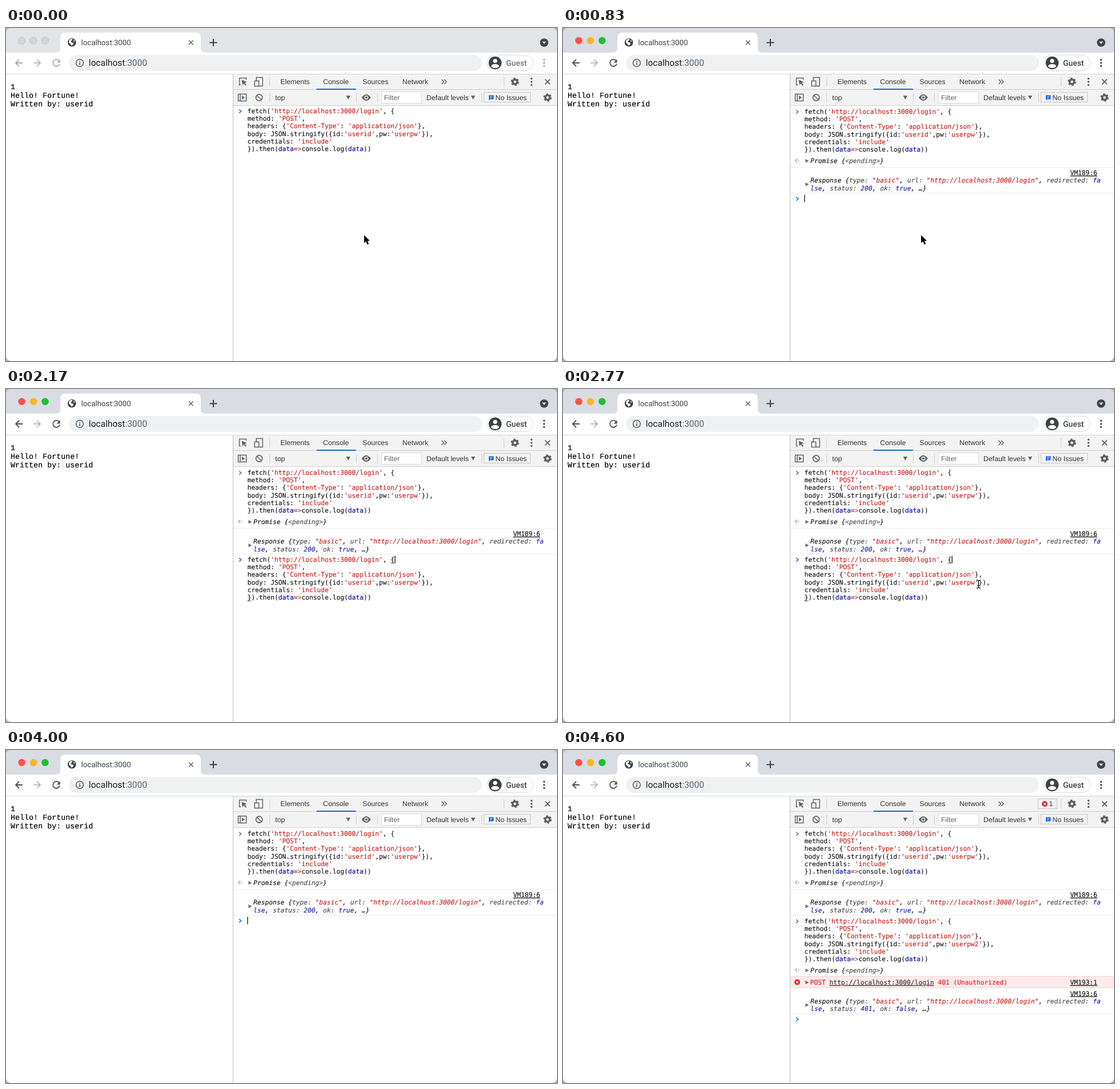
An HTML page that plays this animation: 962 px wide and 582 px high, repeating every 4860 ms.

```html
<!DOCTYPE html>
<html lang="en">
<head>
<meta charset="utf-8">
<title>Console login</title>
<style>
  html, body { margin: 0; width: 100%; height: 100%; overflow: hidden; background: #b4b5b7; }
  svg { display: block; width: 962px; height: 582px; --frame: #d9dce3; --ink: #494c50; --name: #3c4043; }
  svg.idle { --frame: #e3e4e8; --ink: #a9abae; --name: #717477; }
  text { white-space: pre; text-rendering: geometricPrecision; }
  .ui { font: 12.3px "Liberation Sans", Arial, sans-serif; fill: #333; }
  .bar { font-family: Roboto, sans-serif; fill: #3c4043; }
  .page { font: 13.33px "Liberation Mono", monospace; stroke: #000; stroke-width: .2; }
  .code { font: 11.22px "DejaVu Sans Mono", monospace; color: #111; }
  .code, .code tspan { fill: currentColor; stroke: currentColor; stroke-width: .12; }
  .it { font-style: italic; }
  .s { color: #c41a16; } .v { color: #00009f; } .o { color: #a52a2a; }
  .n { color: #1a1aa6; } .k { color: #484848; } .u { text-decoration: underline; }
  .err { color: #e0161e; } .err .u { color: #333; }
  .line { fill: none; stroke: #5f6368; stroke-width: 1.5; }
  .ink { fill: none; stroke: var(--ink); stroke-width: 1.8; }
  .light { fill: var(--c); }
  .idle .light { fill: #d3d4d8; stroke: #c2c3c7; }
</style>
</head>
<body>
<svg id="stage" viewBox="0 0 962 582"></svg>
<script>
const LOOP = 4860, LEFT = 421.5, CHAR = 6.755, ROW = 13.2;
const stage = document.getElementById('stage');

const text = (x, y, cls, s, more = '') => `<text x="${x}" y="${y}" class="${cls}" ${more}>${s}</text>`;
const rect = (x, y, w, h, fill, more = '') => `<rect x="${x}" y="${y}" width="${w}" height="${h}" fill="${fill}" ${more}/>`;
const circle = (x, y, r, fill, more = '') => `<circle cx="${x}" cy="${y}" r="${r}" fill="${fill}" ${more}/>`;
const path = (d, cls = 'line', more = '') => `<path d="${d}" class="${cls}" ${more}/>`;
const solid = (d, fill = '#5f6368') => `<path d="${d}" fill="${fill}"/>`;
const cross = (x, y, r, more) => path(`M${x - r} ${y - r}l${2 * r} ${2 * r}m0 ${-2 * r}l${-2 * r} ${2 * r}`, 'line', more);
const dots = (x, y, fill) => [-5.5, 0, 5.5].map(d => circle(x, y + d, 1.7, fill)).join('');
const gear = (x, y) =>
  circle(x, y, 4, 'none', 'stroke="#5a5d61" stroke-width="3.4"') +
  circle(x, y, 6.3, 'none', 'stroke="#5a5d61" stroke-width="1.9" stroke-dasharray="3.3 3.3"');
const down = (x, y, fill) => solid(`M${x - 3.7} ${y - 3}h7.4l-3.7 6.4z`, fill);
const rule = y => rect(397, y, 565, 1, '#ececec');
const divider = (x, y) => rect(x, y, 1, 16, '#ccc');
// Visible during [from, to) pairs given in ms.
const on = (times, html) => `<g data-on="${times}">${html}</g>`;

function browser() {
  const lights = ['#fe5148', '#fdb424', '#1fc032'].map((c, i) =>
    circle(27.5 + 20.4 * i, 22, 6.2, c, `class="light" style="--c:${c}"`)).join('');
  return rect(0, 0, 962, 582, '#fff') + rect(0, 0, 962, 43, 'var(--frame)') + lights +
    solid('M87 43q8 0 8-8V17q0-9 9-9H331q9 0 9 9V35q0 8 8 8z', '#fff') +
    circle(115, 25.3, 7.3, '#3e4145') +
    solid('M110 22q2-3.500 6-3l-1 3-2 1 1 2 4 1-1 3-3 2-1-3-3-2zM117.500 20l3 3-2 1z', '#fff') +
    text(131.3, 30, 'bar', 'localhost:3000', 'font-size="13.2"') +
    cross(323, 25.5, 3.8) + path('M362 19v13m-6.500-6.500h13', 'line', 'style="stroke:#3c4043;stroke-width:2"') +
    circle(939.5, 25.5, 7.3, '#3f4246') + solid('M936 23.800h7l-3.500 4.200z', '#fff') +
    path('M29 61H17m6-6l-6 6 6 6', 'ink') +
    path('M48 61H60m-6-6l6 6-6 6', 'line', 'style="stroke:#a9abae"') +
    path('M92.500 57A6 6 0 1 0 93.800 62.500', 'ink') + solid('M94.500 54.500v6h-6z', 'var(--ink)') +
    rect(110, 47, 721, 28, '#eff1f3', 'rx="14"') +
    circle(128.7, 61, 6.4, 'none', 'stroke="#55585c" stroke-width="1.500"') +
    rect(127.9, 60, 1.6, 4.8, '#55585c') + rect(127.9, 57, 1.6, 1.7, '#55585c') +
    text(144.5, 66.3, 'bar', '<tspan fill="#202124">localhost</tspan><tspan fill="#5f6368">:3000</tspan>', 'font-size="15.5"') +
    rect(839.5, 47.5, 81, 27, '#fff', 'rx="13.5" stroke="#dadce0"') +
    circle(854, 61, 11.3, '#3e4145') + circle(854, 57.5, 3.6, '#fff') +
    solid('M847 67.500q0-4.500 7-4.500t7 4.500q-3 2.500-7 2.500t-7-2.500z', '#fff') +
    text(873, 66.2, 'bar', 'Guest', 'font-size="13.9" font-weight="500" style="fill:var(--name)"') +
    dots(939.5, 61, 'var(--ink)') +
    rect(0, 80, 962, 1, '#d4d6d9') +
    ['1', 'Hello! Fortune!', 'Written by: userid'].map((s, i) => text(8, 106.6 + 15.2 * i, 'page', s)).join('');
}

function toolbar() {
  const labels = [[479, 98, 'Elements'], [553.5, 98, 'Console'], [622.5, 98, 'Sources'], [692, 98, 'Network'],
    [470, 125.5, 'top'], [734, 125.5, 'Default levels']];
  return rect(396, 81, 1, 501, '#bdbdbd') + rect(397, 81, 565, 54, '#f3f3f3') +
    rect(397, 107, 565, 1, '#cfcfcf') + rect(397, 135, 565, 1, '#cfcfcf') +
    rect(542, 106, 69, 2, '#1a66d8') +
    path('M410 99.500h-2.500v-12h12v3', 'line') + solid('M411.500 90.500l9 4-3.600 1.300 3 4-1.700 1.300-3-4-2.200 3z') +
    path('M437 92v-5.500h11v15h-6M434 92.500h7.500v9h-7.500z') +
    divider(460, 86) + divider(869, 86) +
    path('M760.500 90l4 4-4 4m4.500-8l4 4-4 4') +
    gear(888.5, 94) + dots(917.5, 94, '#5a5d61') + cross(945.5, 94, 4.3, 'style="stroke-width:1.8"') +
    path('M405.500 115.500h14v12h-14zm3.500 0v12') + solid('M412 118l5 3.500-5 3.500z') +
    circle(442, 121.5, 5.6, 'none', 'stroke="#5f6368" stroke-width="1.7"') + path('M438 117.500l8 8') +
    [460, 611, 648, 830].map(x => divider(x, 113.5)).join('') +
    down(597.5, 121.3) + down(815.5, 121.3) +
    solid('M621 121.500q8-11 16 0q-8 11-16 0z') + circle(629, 121.5, 3.5, '#f3f3f3') + circle(629, 121.5, 2.1, '#5f6368') +
    rect(655.5, 111.5, 70, 20, '#fff', 'stroke="#dadada"') + text(660, 126, 'ui', 'Filter', 'style="fill:#666"') +
    rect(834.5, 112.5, 81, 17, '#f3f3f3', 'stroke="#c6c6c6"') +
    solid('M843 117.500h8.500v7H845l-2 2z', '#1a66e0') + path('M845 119.800h4.500m-4.500 2.300h3', 'line', 'style="stroke:#fff;stroke-width:.8"') +
    text(854.5, 125.5, 'ui', 'No Issues') + gear(945.5, 121.5) +
    labels.map(([x, y, s]) => text(x, y, 'ui', s)).join('');
}

const chevron = (y, color = '#1a73e8') =>
  path(`M407 ${y - 2.7}l3.700 3.200-3.700 3.200`, 'line', `style="stroke:${color};stroke-width:1.6"`);
const caret = (y, col = 0, row = 0) =>
  rect(LEFT + CHAR * col + (col === 38 ? .5 : -.3), y - 6.5 + ROW * row, 1.2, 13, '#000');
const bracket = (y, col, row) => {
  const x = LEFT + CHAR * col - .3, top = y - 6 + ROW * row;
  return rect(x, top, 7, 12.5, '#eee') + rect(x, top + 12, 7, 1, '#777');
};
const brackets = y => bracket(y, 37, 0) + bracket(y, 0, 5);
const tint = s => s.replace(/'[^']*'|\bdata\b|=>/g, m =>
  `<tspan class="${m[0] === "'" ? 's' : m === 'data' ? 'v' : 'o'}">${m.replace('>', '&gt;')}</tspan>`);

function request(y, pw) {
  return ["fetch('http://localhost:3000/login', {", "method: 'POST',",
    "headers: {'Content-Type': 'application/json'},",
    `body: JSON.stringify({id:'userid',pw:'${pw}'}),`,
    "credentials: 'include'", '}).then(data=>console.log(data))'
  ].map((s, i) => text(LEFT, y + 4 + ROW * i, 'code', tint(s))).join('');
}

const fold = y => solid(`M423.300 ${y - 3}l6 3.200-6 3.200z`, '#6e6e6e');
const link = (y, s) => text(885.5, y, 'code u', s);

function sent(y, pw) {
  const back = y + 86;
  return chevron(y, '#777') + request(y, pw) +
    path(`M409 ${back - 3.5}l-3.300 3 3.300 3`, 'line', 'style="stroke:#999;stroke-width:1.2"') +
    circle(411.5, back - .5, .9, '#999') + fold(back) +
    text(432, back + 4.3, 'code it', 'Promise {<tspan class="k">&lt;pending&gt;</tspan>}') + rule(y + 97);
}

function response(y, source, status, ok) {
  const paint = s => s.replace(/"[^"]*"|\w+:|\b(\d+|true|false|fa|lse)\b/g, m =>
    `<tspan class="${m[0] === '"' ? 's' : m.endsWith(':') ? 'k' : 'n'}">${m}</tspan>`);
  return link(y, source) + fold(y + 16) +
    text(432, y + 13.3, 'code it', paint('Response {type: "basic", url: "http://localhost:3000/login", redirected: fa')) +
    text(432, y + 26.5, 'code it', paint(`lse, status: ${status}, ok: ${ok}, …}`)) + rule(y + 31);
}

const redMark = (x, y) => circle(x, y, 4.9, '#dc2626') + cross(x, y, 1.8, 'style="stroke:#fff;stroke-width:1.2"');
const failure = rect(397, 396, 565, 20, '#fdebeb') + rect(397, 395, 565, 1, '#f7d3d3') + rect(397, 415, 565, 1, '#f7d3d3') +
  redMark(409, 405.7) + fold(406) +
  text(431.5, 410, 'code err', 'POST <tspan class="u">http://localhost:3000/login</tspan> 401 (Unauthorized)') +
  link(410, 'VM193:1') +
  rect(829.5, 85.5, 33, 17, '#f3f3f3', 'stroke="#c6c6c6"') + redMark(841, 94.2) + text(848.5, 98.3, 'ui', '1');

const arrow = `<path d="M0 0V14l3.300-3 2.400 5.400 2.500-1.100-2.400-5.200H10z" transform="translate(625.200 362)"
  stroke="#fff" stroke-width="1.2" paint-order="stroke"/>`;
const beamPath = 'M-3.500-7q2.500 0 3.500 1.500q1-1.500 3.500-1.500M0-5.500V5.500M-3.500 7q2.500 0 3.500-1.500q1 1.500 3.500 1.500M-2 2.500h4';
const beam = `<g id="beam" fill="none"><path d="${beamPath}" stroke="#fff" stroke-width="2.6"/><path d="${beamPath}" stroke="#111" stroke-width="1.4"/></g>`;

stage.innerHTML = '<clipPath id="win"><rect width="962" height="582" rx="9"/></clipPath><g clip-path="url(#win)">' +
  browser() + toolbar() +
  on('200 500', brackets(145) + caret(145, 38)) +
  on('0 500', request(145, 'userpw')) +
  on('0 570', chevron(145)) + on('500 570', caret(145)) +
  on('570 4860', sent(146, 'userpw')) +
  on('570 830', chevron(253) + caret(253)) +
  on('830 4860', response(257, 'VM189:6', 200, true)) +
  on('830 4100', chevron(298)) +
  on('830 1030 1570 1600 4000 4100', caret(298)) +
  on('1600 3130', brackets(298)) +
  on('1600 3570', request(298, 'userpw')) + on('3570 4000', request(298, 'userpw2')) +
  on('1600 2200 2700 3130', caret(298, 38)) +
  on('3130 3570', caret(298, 44, 3)) + on('3570 4000', caret(298, 45, 3)) +
  on('4100 4860', sent(299, 'userpw2')) +
  on('4100 4530', chevron(406) + caret(406)) +
  on('4530 4860', failure) + on('4530 4600', chevron(426)) +
  on('4600 4860', response(429.5, 'VM193:6', 401, false) + chevron(470.3)) +
  on('0 470 570 1600', arrow) + on('2200 3570', beam) + '</g>';

const timed = [...stage.querySelectorAll('[data-on]')].map(el => [el, el.dataset.on.split(' ').map(Number)]);
const beamEl = document.getElementById('beam');
const ease = (t, a, b) => {
  const p = Math.min(1, Math.max(0, (t - a) / (b - a)));
  return p * p * (3 - 2 * p);
};

function draw(now) {
  const t = now % LOOP;
  stage.classList.toggle('idle', t < 70);
  for (const [el, times] of timed) {
    // An odd count of passed marks means the part is showing.
    el.style.display = times.filter(m => m <= t).length % 2 ? '' : 'none';
  }
  const go = ease(t, 2200, 2760), settle = ease(t, 2900, 2980);
  beamEl.setAttribute('transform', `translate(${635 + 90.5 * go - 4 * settle} ${354 - 13 * go - settle})`);
  requestAnimationFrame(draw);
}
draw(performance.now());
</script>
</body>
</html>
```
